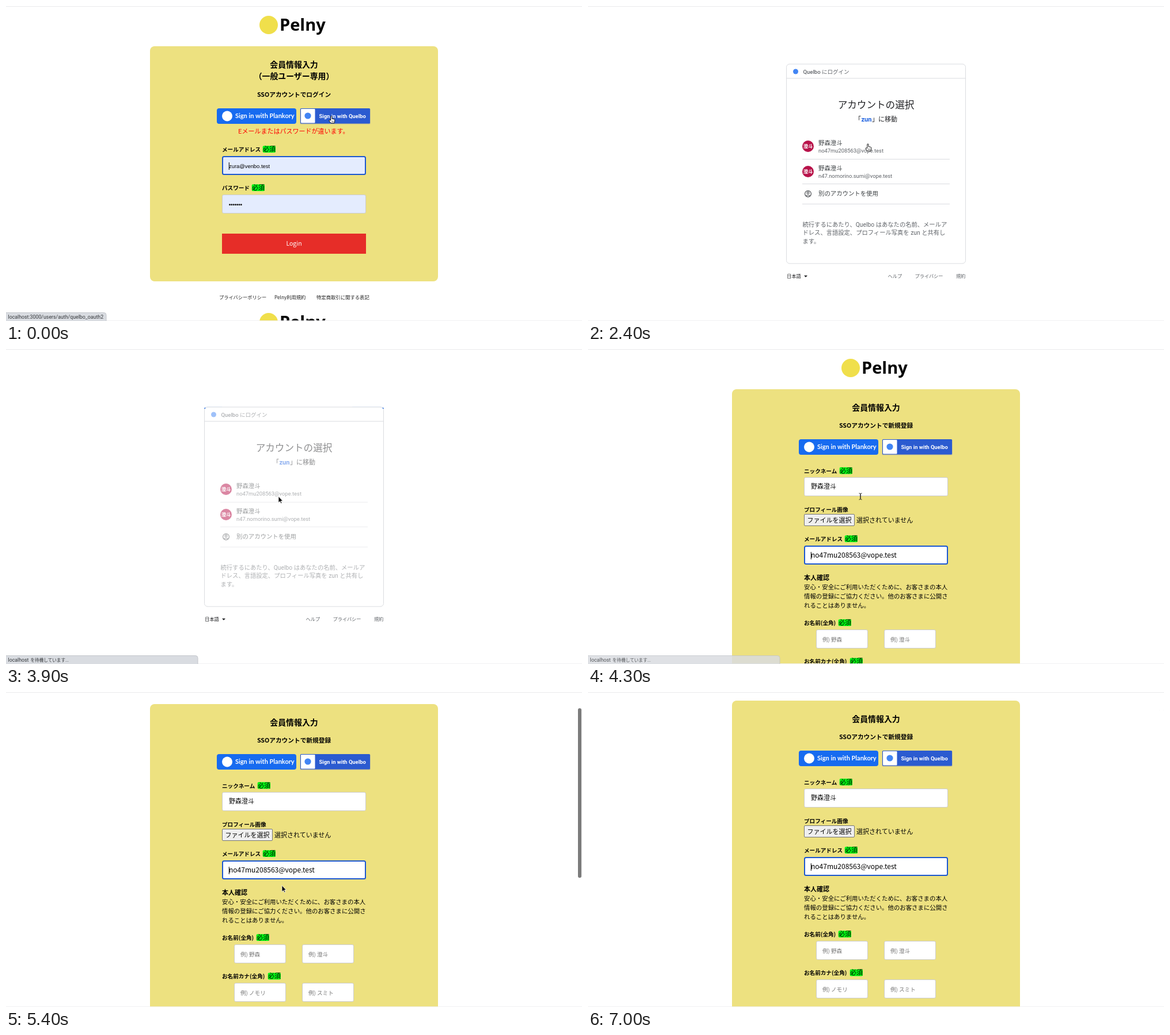
An HTML page for the animation above (7.1 s loop, 1000 by 548 pixels).

```html
<!DOCTYPE html>
<html lang="ja">
<head>
<meta charset="utf-8">
<title>Login flow</title>
<style>
html, body { margin: 0; width: 100%; height: 100%; overflow: hidden; background: #fff; }
svg { display: block; width: 100vw; height: 100vh; }
text { font-family: "Noto Sans CJK JP", "Noto Sans CJK", sans-serif; white-space: pre; }
.ui { font-family: Roboto, "Noto Sans CJK JP", "Noto Sans CJK", sans-serif; }
.arial { font-family: "Liberation Sans", Arial, sans-serif; }
.lato { font-family: Lato, sans-serif; }
.brand { font-family: "Open Sans", sans-serif; }
</style>
</head>
<body>
<svg id="stage" viewBox="0 0 1000 548"></svg>
<script>
const LOOP = 7100, STEP = 100;
const BRAND = 'Pelny', APP = 'zun', IDP = 'Quelbo', SOCIAL = 'Plankory';
const PERSON = '野森澄斗', MAIL = 'no47mu208563@vope.test';

// Markup helpers
const rect = (x, y, w, h, fill, more = '') =>
  `<rect x="${x}" y="${y}" width="${w}" height="${h}" fill="${fill}" ${more}/>`;
const dot = (x, y, r, fill, more = '') =>
  `<circle cx="${x}" cy="${y}" r="${r}" fill="${fill}" ${more}/>`;
const text = (x, y, size, str, more = '') =>
  `<text x="${x}" y="${y}" font-size="${size}" ${more}>${str}</text>`;
const group = (id, body, more = '') => `<g id="${id}" ${more}>${body}</g>`;

const BOLD = 'font-weight="700"';
const MID = 'text-anchor="middle"';
const fill = c => `fill="${c}"`;

const logo = dy =>
  dot(456, 33 + dy, 16, '#f0df4b') +
  text(475, 43 + dy, 29, BRAND, `class="brand" ${BOLD}`);

const title = (y, str) => text(500, y, 13.9, str, `${BOLD} ${MID}`);
const subtitle = (y, str) => text(500, y, 10.7, str, `${BOLD} ${MID}`);

const label = (y, str, tagX) =>
  text(375, y, 9.6, str, BOLD) + (tagX
    ? rect(tagX - .3, y - 9.8, 22.3, 11.8, '#00fa12', 'rx="2"') + text(tagX, y, 11, '必須')
    : '');

const field = (x, y, w, bg = '#fff') =>
  rect(x + .5, y + .5, w - 1, 32, bg, 'rx="2.5" stroke="#ccc"');
const focusField = (y, bg) =>
  rect(376, y + 1, 248, 31, bg, 'rx="2.5" stroke="#1b57d0" stroke-width="2"');
const caret = (id, y) => group(id, rect(386.8, y, 1, 13, '#000'));

const signIn = y =>
  rect(366, y, 138, 27, '#176bf0', 'rx="4"') +
  dot(384, y + 13.5, 9, '#fff') +
  text(398, y + 17, 11, 'Sign in with ' + SOCIAL, `class="lato" ${BOLD} ${fill('#fff')}`) +
  rect(510.5, y + .5, 122, 27, '#b9b69a', 'rx="1.5"') +
  rect(511, y, 121, 26.5, '#2b5bd0', 'rx="1.5"') +
  rect(512, y + 1, 24.5, 24.5, '#fff', 'rx="1"') +
  dot(524, y + 13, 5.6, '#4285f4') +
  text(543.5, y + 16.5, 9.4, 'Sign in with ' + IDP, `class="ui" ${BOLD} ${fill('#fff')}`);

const bullets = (y, gap, r) =>
  Array.from({ length: 7 }, (_, i) => dot(388.5 + i * gap, y, r, '#111')).join('');

const CARD = '#ede180', AUTO = '#e4ecfe';

function loginPage() {
  return logo(0) + logo(517) +
    rect(250, 70, 500, 409, CARD, 'rx="8"') +
    title(106.5, '会員情報入力') + title(127, '（一般ユーザー専用）') +
    subtitle(158, 'SSOアカウントでログイン') + signIn(178) +
    text(403, 222.3, 11, 'Eメールまたはパスワードが違います。', fill('#f00')) +
    label(253, 'メールアドレス', 446) + label(320, 'パスワード', 427) +
    field(375, 328, 250, AUTO) +
    group('before', focusField(261, AUTO) +
      text(387, 282, 9.4, 'zura@venbo.test', 'class="arial"') +
      caret('caretA', 272) + bullets(345.7, 3.3, 1.4)) +
    group('after', field(375, 261, 250, AUTO) +
      text(387, 282, 11.5, 'zura@venbo.test') + bullets(345.7, 5.6, .8)) +
    rect(375, 396, 250, 35, '#e62d28') +
    text(500, 417, 10.5, 'Login', `${MID} ${fill('#fff')}`) +
    text(370, 509.6, 8.25, 'プライバシーポリシー', fill('#222')) +
    text(466, 509.6, 8.25, BRAND + '利用規約', fill('#222')) +
    text(539, 509.6, 8.35, '特定商取引に関する表記', fill('#222'));
}

function account(y, mail) {
  return dot(382, y, 10, '#b8124a') +
    text(382, y + 3, 8.4, PERSON.slice(2), `${MID} ${BOLD} ${fill('#fff')}`) +
    text(400, y - 2.5, 10.4, PERSON, fill('#3c4043')) +
    text(400, y + 10.7, 9.4, mail, `class="ui" ${fill('#5f6368')}`);
}

function chooserPage() {
  const grey = fill('#5f6368'), line = y => rect(372, y, 256, 1, '#dadce0');
  const body = dot(360.5, 114, 4.5, '#4285f4') +
    text(373.5, 117.6, 9.5, IDP + ' にログイン', `class="ui" font-weight="500" ${grey}`) +
    text(500, 177.7, 16.6, 'アカウントの選択', `${MID} ${fill('#202124')}`) +
    text(463, 201, 11, '「', fill('#202124')) +
    text(474.5, 201, 11, APP, `class="ui" ${BOLD} ${fill('#1a5fe0')}`) +
    text(493, 201, 11, '」に移動', fill('#202124')) +
    account(244, MAIL) + line(266) +
    account(288, 'n47.nomorino.sumi@vope.test') + line(309) +
    `<g fill="none" stroke="#4a4d51" stroke-width="1.2"><circle cx="382" cy="326.7" r="5.4"/>
     <circle cx="382" cy="325.2" r="1.8"/><path d="M378.3 330.5q3.7-3 7.4 0"/></g>` +
    text(400, 330.2, 10.4, '別のアカウントを使用', fill('#3c4043')) + line(344) +
    [`続行するにあたり、${IDP} はあなたの名前、メールア`,
     `ドレス、言語設定、プロフィール写真を ${APP} と共有し`, 'ます。']
      .map((s, i) => text(372.5, 383.7 + i * 14.4, 10.3, s, `class="ui" ${grey}`)).join('');
  return rect(344.5, 101, 311, 347, '#fff', 'rx="5.5" stroke="#dadce0"') +
    rect(345, 125.3, 310, 1, '#dadce0') + group('chooserBody', body) +
    `<clipPath id="barClip"><path d="M344 104.2V106q0-5.5 5.5-5.5H650.5q5.5 0 5.5 5.5V104.2Z"/>
     <rect x="346" y="100.8" width="308" height="3.4"/></clipPath>` +
    group('bar', rect(344, 100.8, 312, 3.4, '#dadada') +
      rect(344, 100.8, 0, 3.4, '#1967e0', 'id="segA"') +
      rect(344, 100.8, 0, 3.4, '#1967e0', 'id="segB"'), 'clip-path="url(#barClip)"') +
    text(345, 473, 8.3, '日本語', `font-weight="500" ${fill('#202124')}`) +
    '<path d="M375 468.7h6l-3 3.2z" fill="#202124"/>' +
    text(520.5, 473, 8.2, 'ヘルプ', grey) + text(567.5, 473, 8.2, 'プライバシー', grey) +
    text(639, 473, 8.2, '規約', grey);
}

function pair(y, a, b) {
  const hint = (x, s) => field(x, y, 90) + text(x + 11, y + 20.8, 9.6, '例) ' + s, fill('#757575'));
  return hint(396, a) + hint(514, b);
}

function signupPage() {
  return logo(0) + rect(250, 70, 500, 900, CARD, 'rx="8"') +
    title(106.5, '会員情報入力') + subtitle(137, 'SSOアカウントで新規登録') + signIn(157) +
    label(215.5, 'ニックネーム', 437) + field(375, 223, 250) + text(387, 243.2, 11, PERSON) +
    label(282.7, 'プロフィール画像') +
    rect(375.5, 287.5, 87, 20, '#efefef', 'rx="1.5" stroke="#767676"') +
    text(380.5, 301.6, 11, 'ファイルを選択') + text(466, 301.6, 11, '選択されていません') +
    label(334, 'メールアドレス', 446) + focusField(342, '#fff') +
    text(387, 363.2, 12, MAIL) + caret('caretB', 353) +
    text(375, 401.5, 11, '本人確認', BOLD) +
    ['安心・安全にご利用いただくために、お客さまの本人',
     '情報の登録にご協力ください。他のお客さまに公開さ', 'れることはありません。']
      .map((s, i) => text(375, 417.5 + i * 16, 10.42, s)).join('') +
    label(480, 'お名前(全角)', 435) + pair(488, '野森', '澄斗') +
    label(547.3, 'お名前カナ(全角)', 455) + pair(555, 'ノモリ', 'スミト');
}

const statusBox = w =>
  `<path d="M-1 533.5H${w - 4}q4 0 4 4V549H-1z" fill="#d9dce1" stroke="#c3c6cb"/>`;
const STATUS = `class="ui" ${fill('#33363a')}`;
const cursorPaths = {
  arrow: '<path d="M0 0V11L2.6 8.7 4.3 12.3 6 11.6 4.3 8.1H7.6Z" fill="#000" stroke="#fff" stroke-width=".8"/>',
  hand: '<path d="M-1.2 7.5V1A1.1 1.1 0 0 1 1 1V4.6L4.8 5.4Q6 5.8 5.8 7L5 12.2H-.8L-4 8.4Q-4.4 6.7-2.8 6.9Z" fill="#fff" stroke="#000" stroke-width=".9"/><path d="M1 8.2v2.3M3 8.2v2.3" stroke="#000" stroke-width=".7"/>',
  beam: '<path d="M-2.5-5.5Q0-5.5 0-4V4Q0 5.5-2.5 5.5M2.5-5.5Q0-5.5 0-4V4Q0 5.5 2.5 5.5" fill="none" stroke="#222" stroke-width="1"/>'
};

document.getElementById('stage').innerHTML =
  rect(0, 0, 1000, 548, '#fff') +
  group('login', loginPage()) + group('chooser', chooserPage()) + group('signup', signupPage()) +
  rect(0, 0, 1000, 1, '#e9e9eb') + rect(0, 547, 1000, 1, '#f1f1f3') +
  group('thumb', rect(993, 2, 6, 295, '#7b7b7b', 'rx="3"')) +
  group('link', statusBox(174) +
    text(3.5, 544, 8.8, 'localhost:3000/users/auth/quelbo_oauth2', STATUS)) +
  group('wait', statusBox(333) + text(3.5, 544, 8.8, 'localhost', STATUS) +
    text(42.5, 544, 7.6, 'を待機しています...', STATUS)) +
  group('cursor', Object.entries(cursorPaths).map(([k, d]) => group(k, d)).join(''));

const el = {};
document.querySelectorAll('#stage [id]').forEach(n => el[n.id] = n);
const show = (id, on) => el[id].setAttribute('visibility', on ? 'inherit' : 'hidden');
const fade = (id, o) => el[id].setAttribute('opacity', o);
const shift = (id, x, y) => el[id].setAttribute('transform', `translate(${x} ${y})`);

const clamp = v => Math.min(1, Math.max(0, v));
const ramp = (t, a, b) => clamp((t - a) / (b - a));
const smooth = v => v * v * (3 - 2 * v);

// Piecewise track through [time, ...values] keys
function track(keys, t, ease = v => v) {
  let i = 0;
  while (i < keys.length - 2 && t >= keys[i + 1][0]) i++;
  const [a, b] = [keys[i], keys[i + 1]], k = ease(ramp(t, a[0], b[0]));
  return a.slice(1).map((v, j) => v + (b[j + 1] - v) * k);
}

const pointer = [[0, 565, 191.5], [1700, 565, 191.5], [2300, 486, 240], [2900, 486, 240],
  [3500, 473, 255], [4000, 473, 256.5], [4500, 473, 256.5], [5000, 479, 336.5], [7100, 479, 336.5]];
const scrollKeys = [[0, 0], [5200, 0], [5300, 10], [5400, 49], [5500, 54], [5600, 55], [7100, 55]];

function segment(id, u) {
  const head = clamp(u / .5), tail = clamp((u - .3) / .5);
  el[id].setAttribute('x', 344 + 312 * tail);
  el[id].setAttribute('width', 312 * (head - tail));
}

function draw(t) {
  const clicked = t >= 900, blink = t % 1000 < 500;
  show('login', t < 1600);
  show('chooser', t >= 1600 && t < 4000);
  show('signup', t >= 4000);
  show('before', !clicked);
  show('after', clicked);
  show('caretA', blink);
  show('caretB', blink);

  fade('chooserBody', 1 - .5 * ramp(t, 2900, 3200));
  show('bar', t >= 2900);
  segment('segB', (t - 2900) / 1404);
  segment('segA', (t - 3830) / 1404);

  const [scroll] = track(scrollKeys, t);
  shift('signup', 0, -scroll);
  shift('thumb', 0, scroll * .538);
  fade('thumb', t < 5300 ? 0 : 1 - ramp(t, 6000, 6300));

  fade('link', 1 - ramp(t, 1400, 1800) * (t > 1500 ? 1 : .5));
  fade('wait', t < 3400 ? 0 : 1 - ramp(t, 4200, 4500) * (t > 4300 ? 1 : .5));

  const [x, y] = track(pointer, t, smooth);
  const onRow = t >= 1600 && t < 2900 && y > 223;
  const kind = !clicked || onRow ? 'hand' : t >= 4000 && t < 4600 ? 'beam' : 'arrow';
  Object.keys(cursorPaths).forEach(k => show(k, k === kind));
  shift('cursor', x, y);
  show('cursor', t < 6100);
}

function tick() {
  const t = performance.now() % LOOP;
  draw(Math.floor(t / STEP) * STEP);
  requestAnimationFrame(tick);
}
tick();
</script>
</body>
</html>
```
